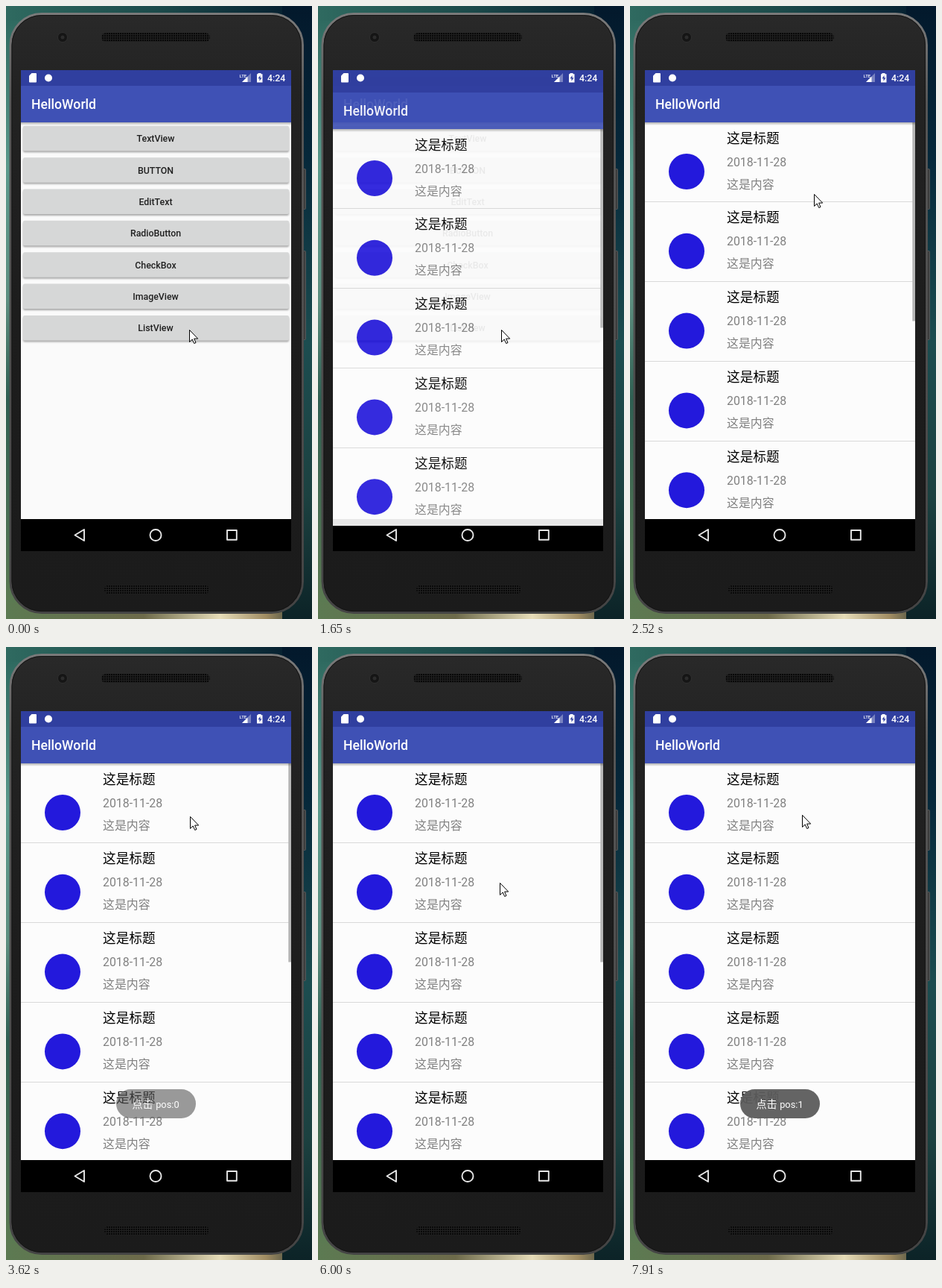
An HTML page that plays this animation: 411 px wide and 822 px high, repeating every 8 s.

```html
<!DOCTYPE html>
<html lang="zh-CN">
<head>
<meta charset="utf-8">
<title>ListView demo</title>
<style>
  html, body { margin: 0; width: 100%; height: 100%; overflow: hidden; background: #1c1c1c; }
  svg { display: block; width: 100%; height: 100%; }
  text { font-family: Roboto, "Noto Sans CJK SC", "Noto Sans CJK JP", sans-serif; }
  .medium { font-weight: 500; }
  .crisp { shape-rendering: crispEdges; }
  .buttons text { font-size: 12.35px; font-weight: 500; fill: #212121; text-anchor: middle; }
  .grey { font-size: 15.88px; fill: #808080; }
  .toast text { font-size: 14.1px; fill: #fff; }
  .toast tspan { font-size: 12.8px; }

  .anim { animation: 8s step-end infinite; }
  #press { animation-name: press; }
  #listWindow { animation-name: enter; }
  #scrollbar { animation-name: scrollbar; }
  #toast0 { animation-name: toast0; }
  #toast1 { animation-name: toast1; }
  #cursor { animation-name: cursor; }

  @keyframes press {
    0% { opacity: 0 }
    17.125%, 100% { opacity: 1 }
  }
  @keyframes enter {
    0% { opacity: 0; transform: translateY(32px) }
    19% { opacity: .5; transform: translateY(32px) }
    20.5% { opacity: .92; transform: translateY(9px) }
    22.125% { opacity: 1; transform: translateY(2px) }
    24%, 100% { opacity: 1; transform: none }
  }
  @keyframes scrollbar {
    0% { opacity: 1 }
    61% { opacity: .75 }
    62.5% { opacity: .3 }
    64.5% { opacity: 0 }
    73.5% { opacity: 1 }
    92% { opacity: .8 }
    93.5% { opacity: .45 }
    95% { opacity: .1 }
    97%, 100% { opacity: 0 }
  }
  @keyframes toast0 {
    0% { opacity: 0 }
    43.25% { opacity: .25 }
    45.25% { opacity: .65 }
    46.75% { opacity: .9 }
    48.625% { opacity: 1 }
    69.75% { opacity: .85 }
    71.625% { opacity: .5 }
    73.5% { opacity: .15 }
    75%, 100% { opacity: 0 }
  }
  @keyframes toast1 {
    0% { opacity: 0 }
    76.875% { opacity: .3 }
    78.75% { opacity: .75 }
    80.625%, 100% { opacity: 1 }
  }
  @keyframes cursor {
    0% { transform: translate(246px, 434px) }
    25.5% { transform: translate(247px, 421px) }
    27% { transform: translate(248px, 380px) }
    28.5% { transform: translate(248px, 330px) }
    30% { transform: translate(248px, 285px) }
    31.5% { transform: translate(247px, 252px) }
    33% { transform: translate(247px, 233px) }
    36.5% { transform: translate(247px, 227px) }
    55.25% { transform: translate(246px, 228px) }
    61% { transform: translate(246px, 246px) }
    62.5% { transform: translate(246px, 281px) }
    64.5% { transform: translate(245px, 303px) }
    66.375% { transform: translate(244px, 307px) }
    68.25% { transform: translate(244px, 313px) }
    69.75% { transform: translate(244px, 316px) }
    80.625% { transform: translate(240px, 318px) }
    82.5% { transform: translate(228px, 327px) }
    84% { transform: translate(221px, 332px) }
    88.75% { transform: translate(223px, 332px) }
    90.25% { transform: translate(225px, 331px) }
    92% { transform: translate(226px, 315px) }
    93.5% { transform: translate(228px, 289px) }
    95% { transform: translate(229px, 261px) }
    97% { transform: translate(229px, 237px) }
    98.875%, 100% { transform: translate(231px, 225px) }
  }
</style>
</head>
<body>
<svg viewBox="0 0 411 822" preserveAspectRatio="none">
  <defs>
    <linearGradient id="leftWall" x2="0" y2="1">
      <stop offset="0" stop-color="#2f6a60"/><stop offset=".25" stop-color="#5b9a8c"/>
      <stop offset=".48" stop-color="#5d8f80"/><stop offset=".65" stop-color="#2f5f52"/>
      <stop offset="1" stop-color="#5c7a52"/>
    </linearGradient>
    <linearGradient id="rightWall" x2="0" y2="1">
      <stop offset="0" stop-color="#03192c"/><stop offset=".25" stop-color="#06283a"/>
      <stop offset=".55" stop-color="#1c4d50"/><stop offset=".8" stop-color="#1c4140"/>
      <stop offset="1" stop-color="#0c2327"/>
    </linearGradient>
    <linearGradient id="topWall">
      <stop offset="0" stop-color="#2f6a60"/><stop offset=".5" stop-color="#1c4a4a"/>
      <stop offset="1" stop-color="#03192c"/>
    </linearGradient>
    <linearGradient id="bottomWall">
      <stop offset="0" stop-color="#5c7a52"/><stop offset=".45" stop-color="#6d6a4a"/>
      <stop offset=".7" stop-color="#e6dcb8"/><stop offset=".85" stop-color="#a08c62"/>
      <stop offset="1" stop-color="#0c2327"/>
    </linearGradient>
    <linearGradient id="body" x2="0" y2="1">
      <stop offset="0" stop-color="#292929"/><stop offset=".12" stop-color="#232323"/>
      <stop offset=".5" stop-color="#1d1d1d"/><stop offset="1" stop-color="#1b1b1b"/>
    </linearGradient>
    <linearGradient id="rim" x2="0" y2="1">
      <stop offset="0" stop-color="#7a7a7a"/><stop offset=".15" stop-color="#555"/>
      <stop offset="1" stop-color="#444"/>
    </linearGradient>
    <linearGradient id="barShadow" x2="0" y2="1">
      <stop offset="0" stop-opacity=".3"/><stop offset="1" stop-opacity="0"/>
    </linearGradient>
    <pattern id="mesh" width="3" height="3" patternUnits="userSpaceOnUse">
      <rect width="3" height="3" fill="#202020"/><rect width="2" height="2" fill="#080808"/>
    </pattern>
    <filter id="soft" x="-5%" y="-30%" width="110%" height="160%"><feGaussianBlur stdDeviation="1.3"/></filter>

    <g id="bars">
      <rect class="crisp" x="20" y="156" width="363" height="4" fill="url(#barShadow)"/>
      <rect class="crisp" x="20" y="86" width="363" height="21" fill="#303f9f"/>
      <rect class="crisp" x="20" y="107" width="363" height="49" fill="#3f51b5"/>
      <text class="medium" x="34" y="138.3" font-size="17.65" fill="#fff">HelloWorld</text>
    </g>
    <g id="row">
      <rect class="crisp" x="20" y="-.6" width="363" height="1" fill="#d9d9d9"/>
      <circle cx="76" cy="66" r="24" fill="#2319dc"/>
      <text x="130" y="27.7" font-size="17.65">这是标题</text>
      <text class="grey" x="130" y="58.6">2018-11-28</text>
      <text class="grey" x="130" y="88.5">这是内容</text>
    </g>
    <g id="key">
      <rect x="23" y="2" width="357" height="33.5" rx="2" opacity=".32" filter="url(#soft)"/>
      <rect x="23" y="0" width="357" height="33.5" rx="2" fill="#d6d7d7"/>
    </g>
  </defs>

  <!-- Desktop -->
  <rect width="411" height="411" fill="url(#topWall)"/>
  <rect y="411" width="411" height="411" fill="url(#bottomWall)"/>
  <rect y="20" width="40" height="780" fill="url(#leftWall)"/>
  <rect x="371" width="40" height="822" fill="url(#rightWall)"/>

  <!-- Phone -->
  <g fill="#3d3d3d" stroke="#606060" stroke-width=".8">
    <rect x="398" y="218.5" width="4.5" height="54" rx="1"/>
    <rect x="398" y="328.5" width="4.5" height="119" rx="1"/>
  </g>
  <rect x="6" y="10.5" width="392.5" height="803" rx="42" fill="url(#body)" stroke="url(#rim)" stroke-width="3"/>
  <rect x="8" y="12.5" width="388.5" height="799" rx="40" fill="none" stroke="#151515"/>
  <circle cx="76" cy="42" r="6.5" fill="#151515" stroke="#303030"/>
  <circle cx="76" cy="42" r="2.5" fill="#2c2c2c"/>
  <rect x="128" y="36" width="146" height="12" rx="6" fill="url(#mesh)"/>
  <rect x="132" y="776.5" width="141" height="12" rx="6" fill="url(#mesh)"/>
  <rect class="crisp" x="20" y="86" width="363" height="645"/>

  <!-- Menu window -->
  <rect class="crisp" x="20" y="156" width="363" height="532" fill="#fafafa"/>
  <g id="press" class="anim">
    <rect x="23" y="419" width="357" height="32" rx="3" opacity=".38" filter="url(#soft)"/>
  </g>
  <g id="menu" class="buttons"></g>
  <use href="#bars"/>

  <!-- List window -->
  <g id="listWindow" class="anim">
    <rect class="crisp" x="20" y="156" width="363" height="532" fill="#fcfcfc"/>
    <g id="rows"></g>
    <rect id="scrollbar" class="anim" x="379.3" y="156" width="3.7" height="266.5" fill="#b6b6b6"/>
    <use href="#bars"/>
  </g>

  <!-- System icons -->
  <g fill="#fff">
    <path d="M34.5 90H40q1 0 1 1v10.500q0 1-1 1H32q-1 0-1-1V93.500Z"/>
    <circle cx="57" cy="96.500" r="5"/>
    <text class="medium" x="313.500" y="95.500" font-size="6">LTE</text>
    <path d="M329 90V102H317Z" opacity=".35"/>
    <path d="M324.500 94.500V102H317Z"/>
    <path d="M338.500 90h4v1.300h2V102.500h-7.500V91.300h1.500Z"/>
    <path d="M341.500 93l-3 4.300h2v3.400l3-4.400h-2Z" fill="#303f9f"/>
    <text class="medium" x="351" y="101" font-size="12.35">4:24</text>
  </g>
  <g fill="none" stroke="#e8e8e8" stroke-width="1.9" stroke-linejoin="round">
    <path d="M105 702V717L92.500 709.500Z"/>
    <circle cx="201" cy="709.500" r="7.500"/>
    <rect x="297" y="703" width="12.800" height="12.800"/>
  </g>

  <g id="toast0" class="toast anim">
    <rect x="148" y="593" width="107" height="39" rx="19.500" fill="#5c5c5c" opacity=".95"/>
    <text x="169.500" y="617.800">点击 <tspan>pos:0</tspan></text>
  </g>
  <g id="toast1" class="toast anim">
    <rect x="148" y="593" width="107" height="39" rx="19.500" fill="#5c5c5c" opacity=".95"/>
    <text x="169.500" y="617.800">点击 <tspan>pos:1</tspan></text>
  </g>

  <g id="cursor" class="anim">
    <path d="M.5 .5V16.500L4.200 13L6.700 18.500L9 17.500L6.600 12.100H11.700Z" fill="#fff" stroke="#000"/>
  </g>
</svg>
<script>
  const labels = ["TextView", "BUTTON", "EditText", "RadioButton", "CheckBox", "ImageView", "ListView"];
  const fill = (id, markup) => { document.getElementById(id).innerHTML = markup; };

  fill("menu", labels.map((label, i) => {
    const y = 160.8 + i * 42.35;
    return `<use href="#key" y="${y}"/><text x="201" y="${y + 21.4}">${label}</text>`;
  }).join(""));

  fill("rows", Array.from({ length: 5 }, (_, i) =>
    `<use href="#row" y="${156 + i * 106.8}"/>`).join(""));
</script>
</body>
</html>
```
